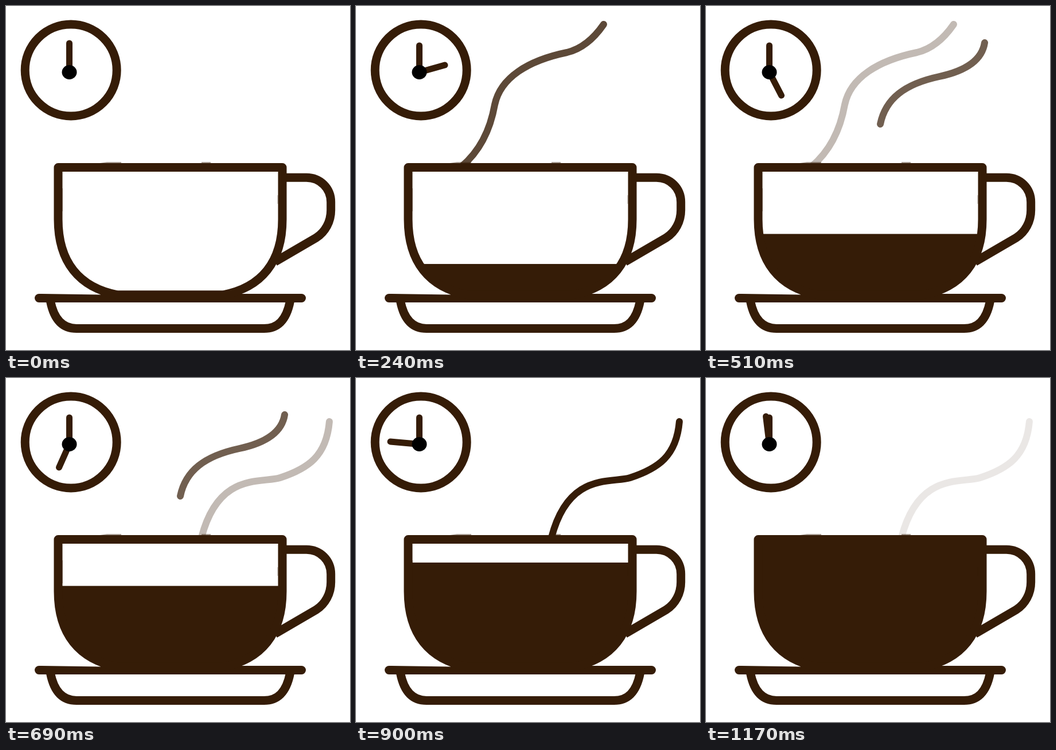
Animation, 600 px wide and 600 px high, one loop 1.2 s. Source, as an HTML page with a canvas:

```html
<!DOCTYPE html>
<html lang="en">
<head>
<meta charset="utf-8">
<title>Coffee time</title>
<style>
html, body { margin: 0; width: 100%; height: 100%; overflow: hidden; background: #fff; }
canvas { display: block; width: 600px; height: 600px; }
</style>
</head>
<body>
<canvas id="stage" width="600" height="600"></canvas>
<script>
const ctx = document.getElementById('stage').getContext('2d');
const BROWN = '#351c07';
const LOOP = 1200, STEP = 30;
const HUB = { x: 110.5, y: 115.5 };

const cup = new Path2D('M91 281.5 H482 V372 C482 446 446 491 378 504 H195 C127 491 91 446 91 372 Z');
const handle = new Path2D('M482 299.3 H524 C548 299.3 566.7 318 566.7 342 V356 C566.7 376 557 394 541 404.3 L469 446.3');
const saucerTop = new Path2D('M57.5 509.5 H515.5');
const saucerBase = new Path2D('M77.5 515 C84 548 100 562.5 123 562.5 H450 C474 562.5 489 548 495.5 515');
const steam = [
  'M432 32 C414 58 393 75 368 81 C300 95 252 125 242 172 C234 217 215 254 184 280',
  'M486 64 C481 97 449 114 407 123 C346 136 313 162 304 206',
  'M564 76 C559 136 527 158 478 174 C446 184 371 163 341 278'
].map(d => new Path2D(d));

// Moving hand: time, angle in degrees, length; the sweep is slightly uneven.
const handKeys = [
  [0, 0, 50.5], [240, 74.3, 46.2], [390, 115.2, 45.9], [510, 152.6, 45.6],
  [690, 204, 44.3], [900, 275, 50.7], [1170, 353, 48.9], [1200, 360, 50.5]
];

function stroke(path, width = 15, cap = 'round') {
  ctx.lineWidth = width;
  ctx.lineCap = cap;
  ctx.stroke(path);
}

function ellipse(x, y, rx, ry = rx) {
  const path = new Path2D();
  path.ellipse(x, y, rx, ry, 0, 0, Math.PI * 2);
  return path;
}

function handAt(t) {
  const i = handKeys.findIndex(key => key[0] > t);
  const [t0, a0, r0] = handKeys[i - 1], [t1, a1, r1] = handKeys[i];
  const k = (t - t0) / (t1 - t0);
  return { angle: (a0 + (a1 - a0) * k) * Math.PI / 180, length: r0 + (r1 - r0) * k };
}

function drawHand(angle, length) {
  const path = new Path2D();
  path.moveTo(HUB.x, HUB.y);
  path.lineTo(HUB.x + length * Math.sin(angle), HUB.y - length * Math.cos(angle));
  stroke(path, 11);
}

function drawClock(t) {
  stroke(ellipse(113.2, 112, 80));
  const { angle, length } = handAt(t);
  drawHand(angle, t === 0 ? length : length);
  drawHand(0, 46.5);
  ctx.fillStyle = '#000';
  ctx.fill(ellipse(HUB.x, HUB.y, 13, 12.5));
}

function drawSteam(t) {
  steam.forEach((path, i) => {
    ctx.globalAlpha = Math.max(0, 1 - Math.abs(t - 300 * (i + 1)) / 300);
    stroke(path, 12);
  });
  ctx.globalAlpha = 1;
}

function drawSaucer() {
  stroke(saucerBase, 15, 'butt');
  stroke(saucerTop);
  ctx.fillStyle = '#fff';
  ctx.fill(new Path2D('M62 501 L165 501 L165 503.5 L62 502 Z'));
}

function drawCup(t) {
  ctx.fillStyle = '#fff';
  ctx.fill(cup);
  const level = 496.5 - 0.194 * t;
  ctx.save();
  ctx.clip(cup);
  ctx.fillStyle = BROWN;
  ctx.fillRect(80, level, 420, 510 - level);
  ctx.restore();
  stroke(handle, 15, 'butt');
  stroke(cup);
}

// Faint smudges along the rim and walls.
function drawSmudges() {
  ctx.fillStyle = 'rgba(53, 28, 7, 0.4)';
  ctx.fill(new Path2D('M164 274 L176 272 H201 V274 Z'));
  ctx.fillRect(341, 272, 16, 2);
  ctx.fillRect(98, 318, 1, 40);
  ctx.fillRect(473.5, 330, 1, 15);
}

function draw(now) {
  const t = Math.floor(now % LOOP / STEP) * STEP;
  ctx.fillStyle = '#fff';
  ctx.fillRect(0, 0, 600, 600);
  ctx.strokeStyle = BROWN;
  ctx.lineJoin = 'round';
  drawSteam(t);
  drawSaucer();
  drawCup(t);
  drawSmudges();
  drawClock(t);
}

let start;
function tick(now) {
  start ??= now;
  draw(now - start);
  requestAnimationFrame(tick);
}
draw(0);
requestAnimationFrame(tick);
</script>
</body>
</html>
```
